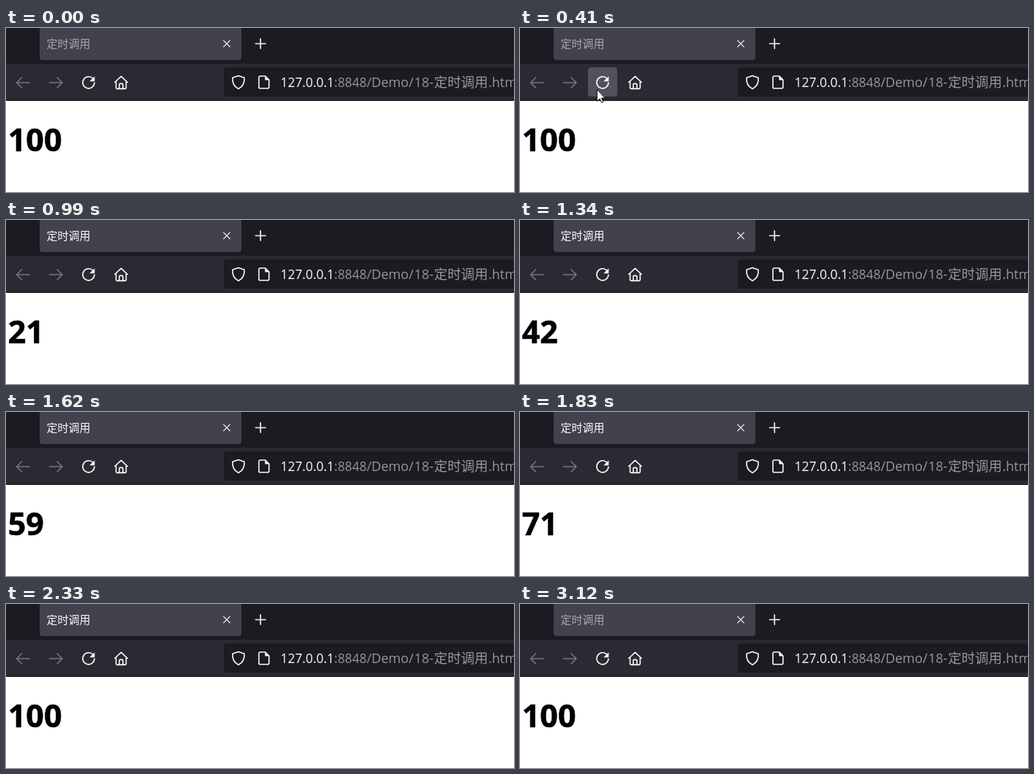
Animation, 695 px wide and 225 px high, one loop 3.19 s. Source, as an HTML page:

```html
<!DOCTYPE html>
<html lang="zh">
<head>
<meta charset="utf-8">
<title>定时调用</title>
<style>
html, body { margin: 0; width: 100%; height: 100%; overflow: hidden; background: #fff; }
svg { display: block; width: 695px; height: 225px; }
.ui { font-family: "Open Sans", "Noto Sans", sans-serif; }
.cjk { font-family: "Noto Sans CJK SC", "Noto Sans CJK", sans-serif; }
.icon { fill: none; stroke: #fbfbfe; stroke-width: 1.6; stroke-linecap: round; stroke-linejoin: round; }
.off { stroke: #78777f; }
</style>
</head>
<body>
<svg viewBox="0 0 695 225">
  <defs>
    <clipPath id="tabClip"><path d="M46 0H322V40a4 4 0 0 1-4 4H50a4 4 0 0 1-4-4Z"/></clipPath>
  </defs>
  <rect width="695" height="225" fill="#fff"/>
  <rect width="695" height="49" fill="#1c1b22"/>
  <rect y="49" width="695" height="50" fill="#2b2a33"/>
  <rect y="99" width="695" height="1" fill="#0c0c0d"/>

  <g clip-path="url(#tabClip)">
    <rect x="46" width="276" height="44" fill="#42414d"/>
    <circle id="burst" cx="62" cy="22" fill="#2b5c99"/>
  </g>
  <text id="title" class="cjk" x="55.5" y="27" font-size="15">定时调用</text>
  <path class="icon" stroke-width="1.2" style="stroke-width:1.2" d="M297.7 17.2l8.6 8.6m0-8.6l-8.6 8.6"/>
  <path class="icon" d="M341.5 21.5h13.5m-6.75-6.75v13.5"/>

  <rect id="hover" x="93" y="54" width="40" height="40" rx="4"/>
  <path class="icon off" d="M32 75H14.5m7-7l-7 7l7 7"/>
  <path class="icon off" d="M59.5 75H77m-7-7l7 7l-7 7"/>
  <path class="icon" d="M119 69.5A8 8 0 1 0 121 75"/>
  <path d="M121.3 66.3v6.2a.8 .8 0 0 1-.8 .8h-6.2z" fill="#fbfbfe"/>
  <path class="icon" d="M148.8 74.5l8.7-8.2l8.7 8.2M150.6 73.2v8.6a1.6 1.6 0 0 0 1.6 1.6h10.6a1.6 1.6 0 0 0 1.6-1.6v-8.6M155 83v-5.6a1 1 0 0 1 1-1h3a1 1 0 0 1 1 1V83"/>

  <rect x="298" y="54" width="410" height="40" rx="4" fill="#1c1b22"/>
  <path class="icon" d="M318 65.5l8 2.8c.6 7-1.4 11.800-8 15.200c-6.600-3.400-8.600-8.200-8-15.200Z"/>
  <path class="icon" d="M347.800 66h7l5 5v10a1.800 1.800 0 0 1-1.800 1.800h-10.200a1.800 1.800 0 0 1-1.800-1.800v-13.200a1.800 1.800 0 0 1 1.800-1.800Z"/>
  <path d="M354.300 66l5.600 5.600h-4.600a1 1 0 0 1-1-1Z" fill="#fbfbfe"/>
  <g class="ui" font-size="17.4" fill="#97969c">
    <text x="375.500" y="81" fill="#fbfbfe">127.0.0.1</text>
    <text x="449" y="81">:8848</text>
    <text x="493.500" y="81" font-size="18">/Demo/</text>
    <text x="558.500" y="81" font-size="18">18-</text>
    <text class="cjk" x="585.500" y="81" font-size="18.500">定时调用</text>
    <text x="660" y="81" font-size="18">.html</text>
  </g>

  <text id="count" class="ui" x="2.800" y="169.300" font-size="43" font-weight="700" fill="#000" stroke="#000" stroke-width=".6">100</text>
  <path id="cursor" d="M.5 .5V16.500L4.200 13.100L6.700 18.500L9 17.500L6.600 12.100H11.300Z" fill="#fff" stroke="#111" stroke-width="1"/>
</svg>
<script>
const LOOP = 3190, PRESS = 480, RELOAD = 640, BLUR = 3120;
const $ = id => document.getElementById(id);
const [title, burst, hover, count, cursor] = ["title", "burst", "hover", "count", "cursor"].map($);
const set = (el, attrs) => { for (const k in attrs) el.setAttribute(k, attrs[k]); };
const lerp = (a, b, p) => a + (b - a) * p;

// The screen refreshes about every 70 ms.
function tick(t) {
  if (t < 70) return 0;
  if (t < RELOAD) return 70 + Math.min(7, Math.floor((t - 70) / 68.5)) * 68.5;
  if (t >= 2330) return t;
  return RELOAD + Math.min(23, Math.floor((t - RELOAD) / 70)) * 70;
}

function pointer(t) {
  if (t < 70 || t >= 780) return null;
  if (t < RELOAD) {
    const p = Math.min(1, (t - 70) / 270), e = 1 - (1 - p) ** 2;
    return [lerp(190, 105, e), lerp(139, 84, e)];
  }
  const p = (t - 570) / 140;
  return [lerp(105, 123, p), lerp(84, 162, p)];
}

function draw(time) {
  const t = tick(time);
  const pos = pointer(t);
  set(cursor, { visibility: pos ? "visible" : "hidden" });
  if (pos) set(cursor, { transform: `translate(${pos})` });

  const over = pos && pos[0] < 133 && pos[1] < 94;
  set(hover, { fill: t >= PRESS && t < 550 ? "#5b5b66" : "#52525e", opacity: over ? 1 : 0 });
  set(title, { fill: t >= PRESS && t < BLUR ? "#fbfbfe" : "#a9a8ae" });

  const b = (t - 710) / 70;
  const lit = b >= 0 && b < 3;
  set(burst, { r: lit ? 86 + 61.5 * b : 0, opacity: lit ? 0.8 - 0.33 * b : 0 });

  const n = t < RELOAD ? 100 : Math.round(4 + (t - 710) * 0.06);
  count.textContent = Math.max(0, Math.min(100, n));
}

function frame() {
  draw(performance.now() % LOOP);
  requestAnimationFrame(frame);
}
frame();
</script>
</body>
</html>
```
